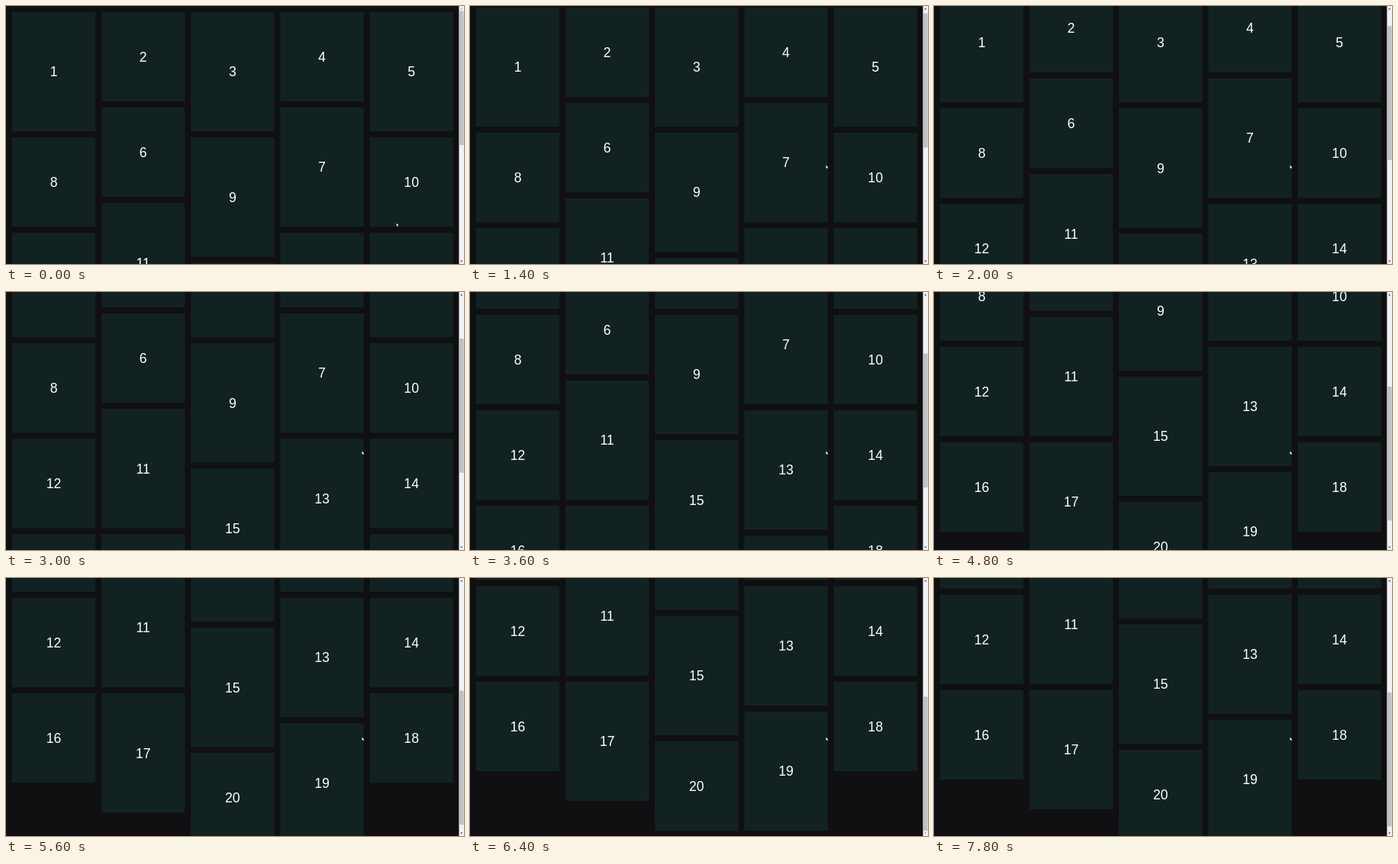
These frames come from a looping animation (600 px wide and 338 px high, 8000 ms). An HTML page with a canvas:

```html
<!DOCTYPE html>
<html lang="en">
<head>
<meta charset="utf-8">
<title>Masonry scroll</title>
<style>
html, body { margin: 0; width: 100%; height: 100%; overflow: hidden; background: #100f11; }
canvas { display: block; }
</style>
</head>
<body>
<canvas width="600" height="338"></canvas>
<script>
const ctx = document.querySelector('canvas').getContext('2d');
const W = 600, H = 338, LOOP = 8000, STEP = 200;
const GAP = 7.9, CARD_W = 109.3, SHORT = 117.2, TALL = 156.3;
const MAX_SCROLL = 286.5, BAR = 6.6;

// Card numbers per column; negative numbers mark tall cards.
const columns = [
  [-1, 8, 12, 16],
  [2, 6, -11, -17],
  [-3, -9, -15, 20],
  [4, -7, -13, -19],
  [-5, 10, 14, 18]
];

// Steady scrolling between these [time, offset] points.
const cruise = [[2000, 38], [3000, 105], [4000, 167], [4800, 225.5]];

function scrollAt(t) {
  if (t < 1000) return 0;
  if (t < 2000) return 38 * ((t - 1000) / 1000) ** 2;
  for (let i = 1; i < cruise.length; i++) {
    const [t0, y0] = cruise[i - 1], [t1, y1] = cruise[i];
    if (t < t1) return y0 + (y1 - y0) * (t - t0) / (t1 - t0);
  }
  if (t < 6400) return MAX_SCROLL - 61 * ((6400 - t) / 1600) ** 2;
  return MAX_SCROLL - 11 * (Math.max(0, t - 7200) / 600) ** 2;
}

function rect(x, y, w, h, color) {
  ctx.fillStyle = color;
  ctx.fillRect(x, y, w, h);
}

function polygon(points, color) {
  ctx.beginPath();
  points.forEach(([x, y]) => ctx.lineTo(x, y));
  ctx.closePath();
  ctx.fillStyle = color;
  ctx.fill();
}

function drawCards(scroll) {
  ctx.font = '17.6px "Liberation Sans", Arial, sans-serif';
  ctx.textAlign = 'center';
  columns.forEach((cards, i) => {
    const x = GAP + i * 117.15;
    let y = GAP - scroll;
    for (const n of cards) {
      const h = n < 0 ? TALL : SHORT;
      rect(x, y, CARD_W, h, '#122222');
      ctx.fillStyle = '#fff';
      ctx.fillText(Math.abs(n), x + CARD_W / 2, y + h / 2 + 6.3);
      y += h + GAP;
    }
  });
}

function drawScrollbar(scroll) {
  const x = W - BAR, mid = W - BAR / 2;
  const arrow = (y, d, active) => polygon(
    [[mid - 1.6, y + d], [mid, y - d], [mid + 1.6, y + d]],
    active ? '#505050' : '#a3a3a3');
  rect(x, 0, BAR, H, '#f1f1f1');
  rect(x + 0.4, BAR + scroll * 0.52, BAR - 0.8, 175.6, '#c1c1c1');
  arrow(3.5, 0.9, scroll > 0);
  arrow(H - 3.5, -0.9, scroll < MAX_SCROLL);
}

function drawCursor(t) {
  const k = Math.min(1, Math.floor(t / STEP) / 2);
  ctx.save();
  ctx.translate(511.3 - 45.2 * k, 283.8 - 75.8 * k);
  polygon([[0, 0], [0, 5.6], [1.3, 4.5], [2.2, 6.4], [3, 6], [2.2, 4.2], [4, 4]], '#000');
  polygon([[0.3, 0.6], [0.3, 4.9], [1.4, 4], [2.3, 5.8], [2.7, 5.6], [1.9, 3.8], [3.3, 3.6]], '#fff');
  ctx.restore();
}

function draw(now) {
  const t = Math.floor(now % LOOP / STEP) * STEP;
  const scroll = scrollAt(t);
  rect(0, 0, W, H, '#100f11');
  drawCards(scroll);
  drawScrollbar(scroll);
  drawCursor(t);
}

const start = performance.now();
function tick() {
  draw(performance.now() - start);
  requestAnimationFrame(tick);
}
tick();
</script>
</body>
</html>
```
